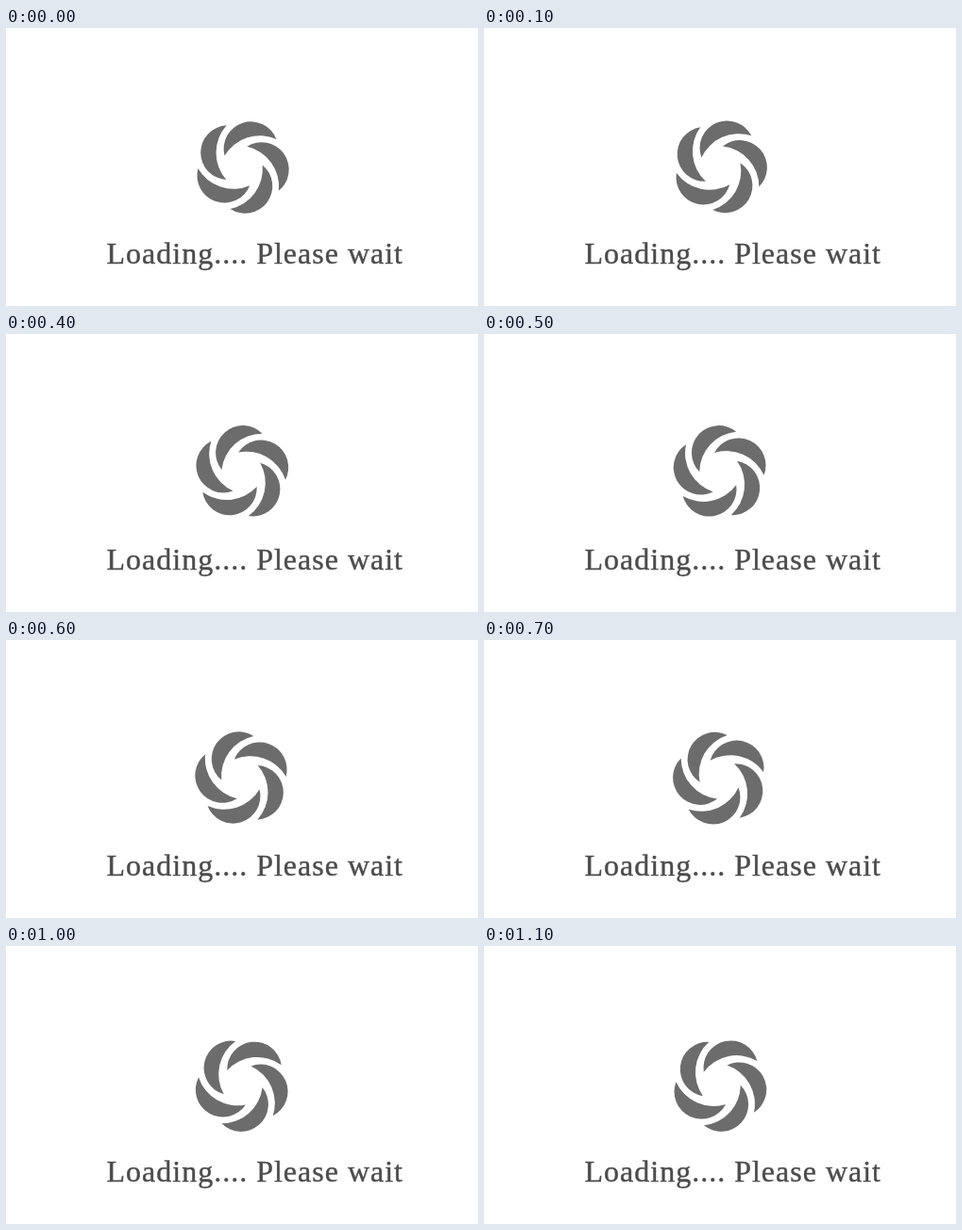
These frames come from a looping animation (500x295 px, 1.2 s). An HTML page:

```html
<!DOCTYPE html>
<html lang="en">
<head>
<meta charset="utf-8">
<title>Loading</title>
<style>
  html, body { margin: 0; width: 100%; height: 100%; overflow: hidden; background: #fff; }
  svg { display: block; width: 500px; height: 295px; }
  text {
    font: 32px "Liberation Serif", "Times New Roman", serif;
    letter-spacing: 1px;
    fill: #4c4c4c;
    stroke: #4c4c4c;
    stroke-width: 0.4px;
  }
</style>
</head>
<body>
<svg viewBox="0 0 500 295">
  <defs>
    <path id="blade" d="M36.5 -29A43.3 43.3 0 0 0 -18.5 -11.5A28.9 28.9 0 0 1 36.5 -29Z"/>
  </defs>
  <g id="spinner" fill="#6c6c6c" transform="translate(250 147)"></g>
  <text x="106.5" y="250">Loading.... Please wait</text>
</svg>
<script>
  const BLADES = 5, STEPS = 12, STEP_MS = 100;
  const SECTOR = 360 / BLADES;
  const spinner = document.getElementById("spinner");

  for (let i = 0; i < BLADES; i++) {
    const blade = document.createElementNS("http://www.w3.org/2000/svg", "use");
    blade.setAttribute("href", "#blade");
    blade.setAttribute("transform", `rotate(${i * SECTOR})`);
    spinner.append(blade);
  }

  // One loop turns the wheel back by a single sector, in hard steps.
  const start = performance.now();
  function draw() {
    const step = Math.floor((performance.now() - start) / STEP_MS) % STEPS;
    const angle = -step * SECTOR / STEPS;
    spinner.setAttribute("transform", `translate(250 147) rotate(${angle})`);
    requestAnimationFrame(draw);
  }
  draw();
</script>
</body>
</html>
```
